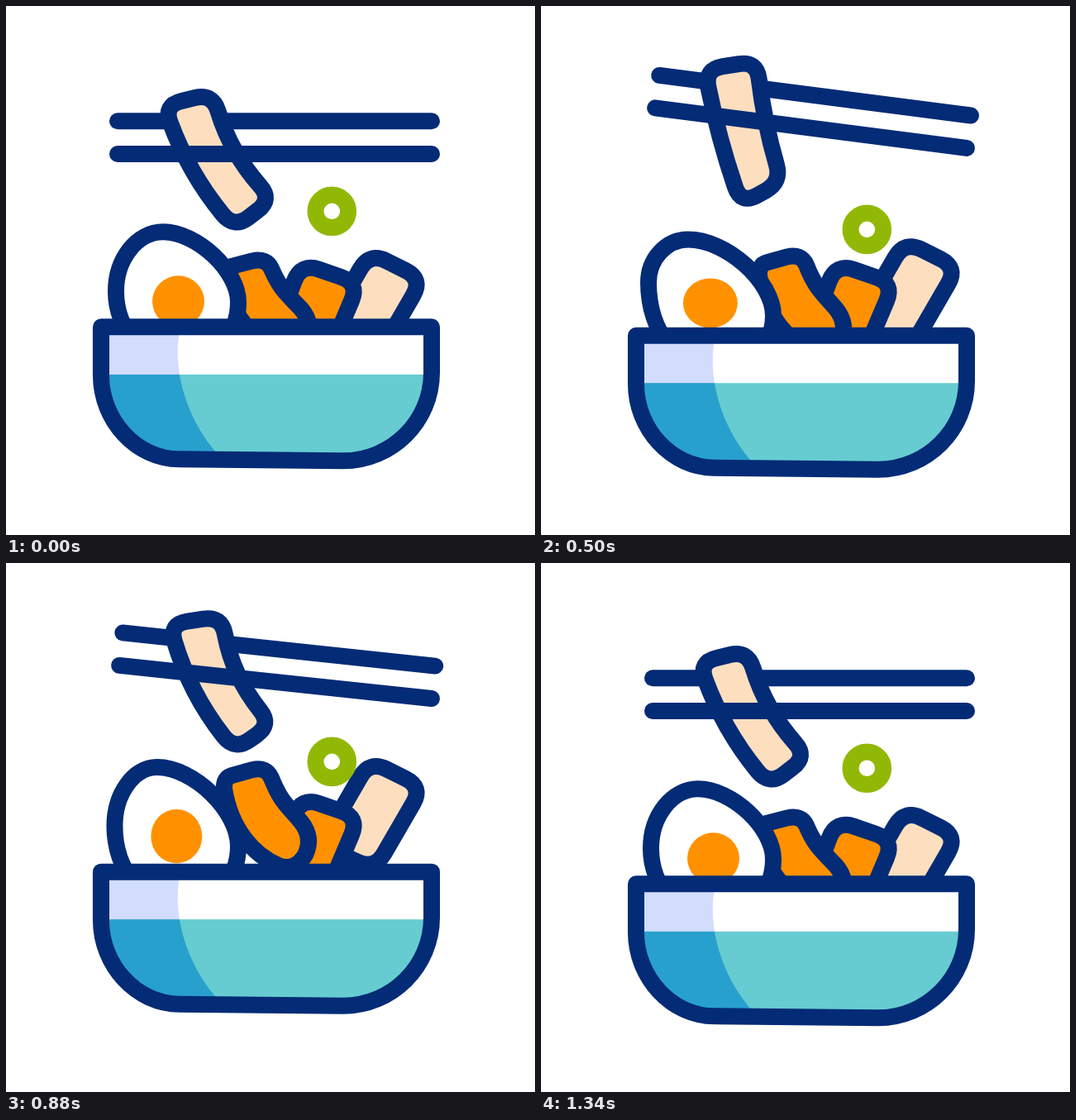
Write an HTML page with a canvas that moves like this. It is 640 px wide and 640 px high and loops after 1.6 s.

```html
<!DOCTYPE html>
<html lang="en">
<head>
<meta charset="utf-8">
<title>Noodle bowl</title>
<style>
  html, body { margin: 0; overflow: hidden; background: #fff; }
  canvas { display: block; }
</style>
</head>
<body>
<canvas id="stage" width="640" height="640"></canvas>
<script>
const ctx = document.getElementById('stage').getContext('2d');
const LOOP = 1600;
const NAVY = '#042b76', ORANGE = '#ff9100', PEACH = '#fddfbf', GREEN = '#92b806';
const KEYS = [0, 160, 320, 350, 500, 680, 740, 1020, 1080, 1340];
let now = 0;

const mix = (a, b, k) => a + (b - a) * k;
const mid = (p, q) => [(p[0] + q[0]) / 2, (p[1] + q[1]) / 2];

// Value at the current time: six poses, plus the dip, the peak and the return to rest.
function at(rest, a, b, c, d, e) {
  const v = [rest, a, b, mix(rest, b, 1.035), c, mix(rest, d, 1.1), d, e, mix(e, rest, 0.5), rest];
  if (now >= KEYS[9]) return rest;
  const i = KEYS.findIndex(k => k > now) - 1;
  const slope = j => (v[j + 1] - v[j]) / (KEYS[j + 1] - KEYS[j]);
  const tangent = j => {
    if (j === 0 || j === 9) return 0;
    const s = slope(j - 1), t = slope(j);
    return s * t > 0 ? 2 * s * t / (s + t) : 0;
  };
  const h = KEYS[i + 1] - KEYS[i], u = (now - KEYS[i]) / h, w = 1 - u;
  return v[i] * w * w * (1 + 2 * u) + v[i + 1] * u * u * (3 - 2 * u)
    + h * u * w * (tangent(i) * w - tangent(i + 1) * u);
}

function paint(path, fill, stroke = NAVY) {
  ctx.fillStyle = fill;
  ctx.fill(path);
  ctx.strokeStyle = stroke;
  ctx.stroke(path);
}

// Rounded polygon; bends[i] is the control point of the side after corner i.
function rounded(corners, size, bends = {}) {
  const n = corners.length, path = new Path2D();
  const bend = i => bends[i] || mid(corners[i], corners[(i + 1) % n]);
  const toward = (p, q) => {
    const k = size / Math.hypot(q[0] - p[0], q[1] - p[1]);
    return [mix(p[0], q[0], k), mix(p[1], q[1], k)];
  };
  path.moveTo(...toward(corners[0], bend(0)));
  for (let i = 0; i < n; i++) {
    const next = corners[(i + 1) % n];
    path.quadraticCurveTo(...bend(i), ...toward(next, bend(i)));
    path.quadraticCurveTo(...next, ...toward(next, bend((i + 1) % n)));
  }
  path.closePath();
  return path;
}

function chunk(corners, y, fill) {
  paint(rounded(corners.map(([px, py]) => [px, py + y]), 23), fill);
}

const sausageShape = new Path2D('M273 18L298 11Q315 7 321 21C332 49 340 54 357 74Q372 93 362 114' +
  'Q350 134 330 127C300 114 272 84 264 34Q263 21 273 18Z');

function sausage(rim) {
  const y = rim + at(-90, -66.5, -52, -106, -150, -116);
  const path = new Path2D();
  path.addPath(sausageShape, new DOMMatrix([1, 0, 0, at(0.92, 0.85, 0.85, 1, 1, 1), 0, y]));
  paint(path, ORANGE);
}

function egg(rim) {
  const left = [at(133, 131, 129, 130, 131, 132), rim + at(-43, -40, -36.5, -64, -68, -45)];
  const top = [at(190, 189, 188, 178, 177, 188), rim + at(-115, -97, -85.5, -116, -138, -117)];
  const right = [281, rim + at(-30, -22, -12, -24, -34, -29)];
  const bottom = [212, rim + 43];
  const path = new Path2D();
  // Quarter curve between a side point and the top or bottom point.
  const quarter = (side, end, k, toSide) => {
    const upright = [side[0], mix(side[1], end[1], k)];
    const level = [mix(end[0], side[0], k), end[1]];
    path.bezierCurveTo(...(toSide ? [...level, ...upright, ...side] : [...upright, ...level, ...end]));
  };
  path.moveTo(...left);
  quarter(left, top, 0.55);
  quarter(right, top, 0.45, true);
  quarter(right, bottom, 0.55);
  quarter(left, bottom, 0.55, true);
  paint(path, '#fff');

  ctx.fillStyle = ORANGE;
  ctx.beginPath();
  ctx.ellipse(208.5 + (top[0] - 190) * 0.3, rim + at(-31, -21, -15, -39, -53, -34),
    at(31.5, 34, 36, 33, 31, 31), at(31, 28, 27, 30, 35, 31), 0, 0, 7);
  ctx.fill();
}

const bowlShape = new Path2D('M115 0H515V55C515 114 467 162 408 162L210 160C157 160 115 112 115 59Z');
const shadeShape = new Path2D('M100 -3H212C198 48 219 117 262 160V180H100Z');

function bowl(rim) {
  const bands = (upper, lower) => {
    ctx.fillStyle = upper;
    ctx.fillRect(100, -10, 430, 67.5);
    ctx.fillStyle = lower;
    ctx.fillRect(100, 57.5, 430, 120);
  };
  ctx.save();
  ctx.translate(0, rim);
  ctx.save();
  ctx.clip(bowlShape);
  bands('#fff', '#66ccd1');
  ctx.clip(shadeShape);
  bands('#d2dcfd', '#28a0cd');
  ctx.restore();
  ctx.strokeStyle = NAVY;
  ctx.stroke(bowlShape);
  ctx.restore();
}

function ring() {
  const path = new Path2D();
  path.arc(394.3, at(248.3, 320, 377.3, 271, 186.3, 282.3), 19.8, 0, 7);
  paint(path, '#fff', GREEN);
}

function stick(offset) {
  ctx.save();
  ctx.translate(515, at(179, 187, 193.5, 172, 157.5, 171.5));
  ctx.rotate(at(0, -1.1, -1.9, 7.3, 12.6, 0.8) * Math.PI / 180);
  ctx.strokeStyle = NAVY;
  ctx.beginPath();
  ctx.moveTo(-380, offset);
  ctx.lineTo(0, offset);
  ctx.stroke();
  ctx.restore();
}

function noodle() {
  const a = [at(191, 190, 189, 198, 208, 190), at(120, 140, 154, 77, 33.5, 109.5)];
  const b = [at(250, 250, 249, 261, 271, 252), at(106, 125, 138, 67, 29, 96)];
  const c = [at(322, 319, 317, 291, 300, 338), at(234, 234, 233, 213, 179, 214)];
  const d = [at(276, 276, 276, 242, 250, 298), at(269, 271, 270, 240, 201, 253)];
  const sag = at(16, 22, 26, 6, 6, 28);
  const bent = (p, q, amount) => {
    const m = mid(p, q), dx = q[0] - p[0], dy = q[1] - p[1], k = amount / Math.hypot(dx, dy);
    return [m[0] - dy * k, m[1] + dx * k];
  };
  paint(rounded([a, b, c, d], 22, { 1: bent(b, c, sag), 3: bent(a, d, sag * 0.9) }), PEACH);
}

function draw() {
  now = performance.now() % LOOP;
  ctx.fillStyle = '#fff';
  ctx.fillRect(0, 0, 640, 640);
  ctx.lineWidth = 20;
  ctx.lineCap = ctx.lineJoin = 'round';

  const rim = at(388.3, 423.3, 451.5, 399, 356, 387.2);
  chunk([[440, 2], [504, 34], [446, 134], [381, 104]], rim + at(-92, -72.5, -62, -116, -159, -112), PEACH);
  chunk([[357, 5], [427, 29], [383, 133], [318, 107]], rim + at(-82, -71, -64.5, -92, -111, -83), ORANGE);
  sausage(rim);
  egg(rim);
  bowl(rim);
  ring();
  stick(-39.7);
  noodle();
  stick(0);
  requestAnimationFrame(draw);
}
draw();
</script>
</body>
</html>
```
